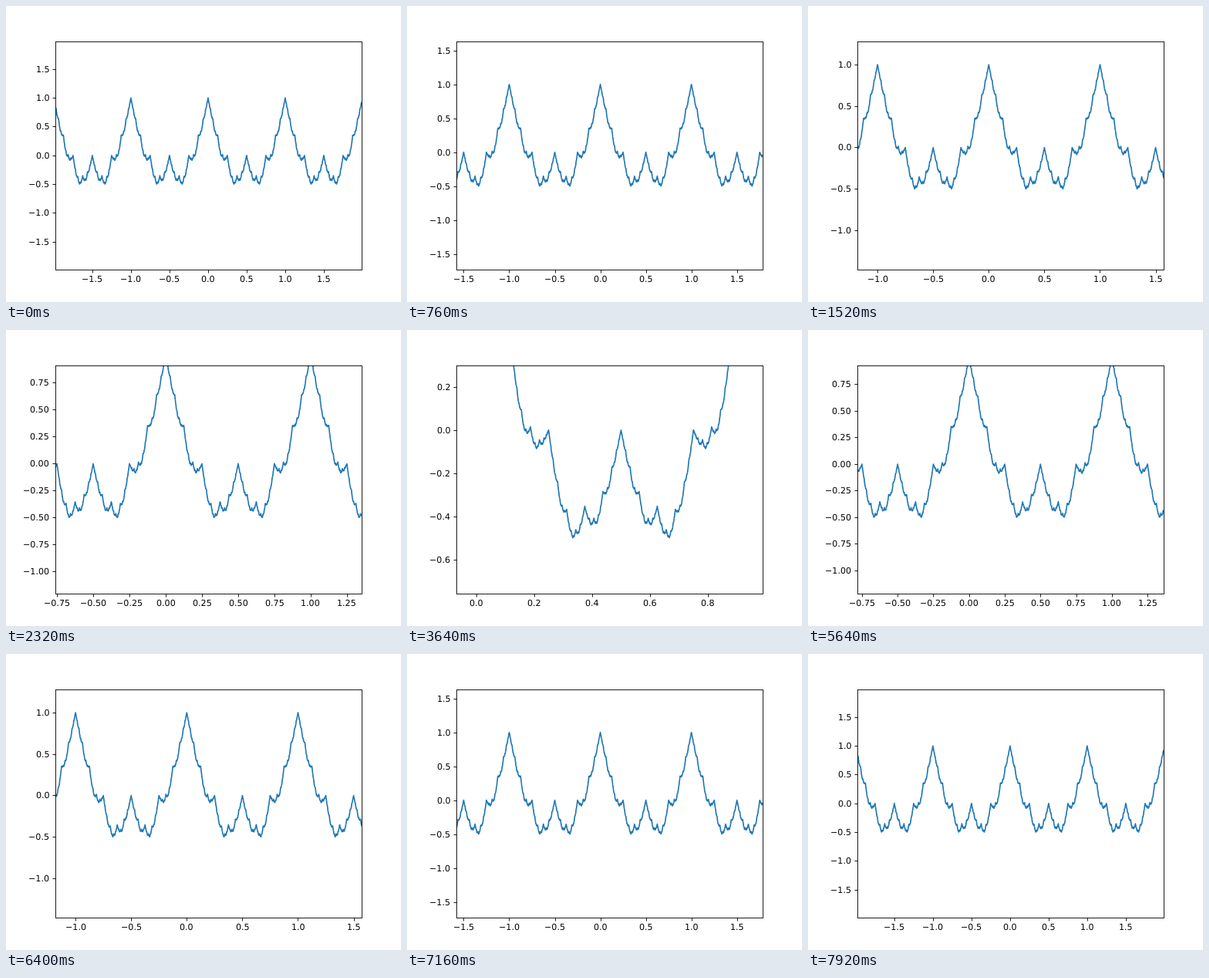
Recreate the animation shown at these times as an HTML page with a canvas. Size 512x384 px, loop 7.96 s.

```html
<!DOCTYPE html>
<html lang="en">
<head>
<meta charset="utf-8">
<title>Zooming into a Weierstrass function</title>
<style>
  html, body { margin: 0; width: 100%; height: 100%; overflow: hidden; background: #fff; }
  canvas { display: block; }
</style>
</head>
<body>
<canvas id="stage" width="512" height="384"></canvas>
<script>
const ctx = document.getElementById('stage').getContext('2d');
const box = { left: 64, right: 460.8, top: 46.08, bottom: 341.76 };
const STEP_MS = 40, LAST = 99, STEPS = 2 * LAST + 1;
const PT = 80 / 72;                       // pixels per point
const SAMPLES = 4000;

function weierstrass(x) {
  let sum = 0;
  for (let n = 1; n <= 20; n++) sum += Math.cos(2 ** n * Math.PI * x) / 2 ** n;
  return sum;
}

function line(x1, y1, x2, y2) {
  ctx.beginPath();
  ctx.moveTo(x1, y1);
  ctx.lineTo(x2, y2);
  ctx.stroke();
}

// Starts on a whole pixel, then spaces the glyphs by their exact widths;
// align is the share of the text left of x
function label(text, x, y, align) {
  ctx.textRendering = 'auto';
  const left = Math.round(x - align * ctx.measureText(text).width);
  ctx.textRendering = 'geometricPrecision';
  ctx.fillText(text, left, y);
}

// Smallest round step that splits the range into at most nine parts
function tickStep(range) {
  return [0.1, 0.2, 0.25, 0.5].find(s => s >= range / 9);
}

function eachTick(center, half, draw) {
  const step = tickStep(2 * half);
  const digits = step === 0.25 ? 2 : 1;
  const end = Math.floor((center + half) / step);
  for (let i = Math.ceil((center - half) / step); i <= end; i++) {
    draw(i * step, (i * step).toFixed(digits).replace('-', '\u2212'));
  }
}

function draw(k) {
  const s = (Math.min(k, STEPS - 1 - k) + 1) / 100;
  const cx = 0.5 * s, cy = -0.25 * s, half = 2 - 1.6 * s;
  const px = x => (box.left + box.right) / 2 + (x - cx) * (box.right - box.left) / 2 / half;
  const py = y => (box.top + box.bottom) / 2 - (y - cy) * (box.bottom - box.top) / 2 / half;

  ctx.fillStyle = '#fff';
  ctx.fillRect(0, 0, 512, 384);

  // The curve is sampled afresh across the visible range
  ctx.save();
  ctx.beginPath();
  ctx.rect(64, 46, 397, 296);
  ctx.clip();
  ctx.beginPath();
  for (let i = 0; i <= SAMPLES; i++) {
    const x = cx + half * (2 * i / SAMPLES - 1);
    ctx.lineTo(px(x), py(weierstrass(x)));
  }
  ctx.strokeStyle = '#1f77b4';
  ctx.lineWidth = 1.5 * PT;
  ctx.lineJoin = 'round';
  ctx.lineCap = 'square';
  ctx.stroke();
  ctx.restore();

  ctx.strokeStyle = ctx.fillStyle = '#000';
  ctx.lineWidth = 0.8 * PT;
  ctx.font = `${10 * PT}px "DejaVu Sans", sans-serif`;

  eachTick(cx, half, (value, text) => {
    const x = px(value), tick = Math.round(x) + 0.5;
    line(tick, 342.5, tick, 346.5);
    label(text, x, 358, 0.5);
  });
  eachTick(cy, half, (value, text) => {
    const y = py(value), tick = Math.round(y) + 0.5;
    line(60.5, tick, 64.5, tick);
    label(text, box.left - 7 * PT, Math.round(y + 4), 1);
  });
  ctx.strokeRect(64.5, 46.5, 397, 296);
}

let shown = -1;
const start = performance.now();
function loop() {
  const k = Math.floor((performance.now() - start) / STEP_MS) % STEPS;
  if (k !== shown) draw(shown = k);
  requestAnimationFrame(loop);
}
loop();
</script>
</body>
</html>
```
